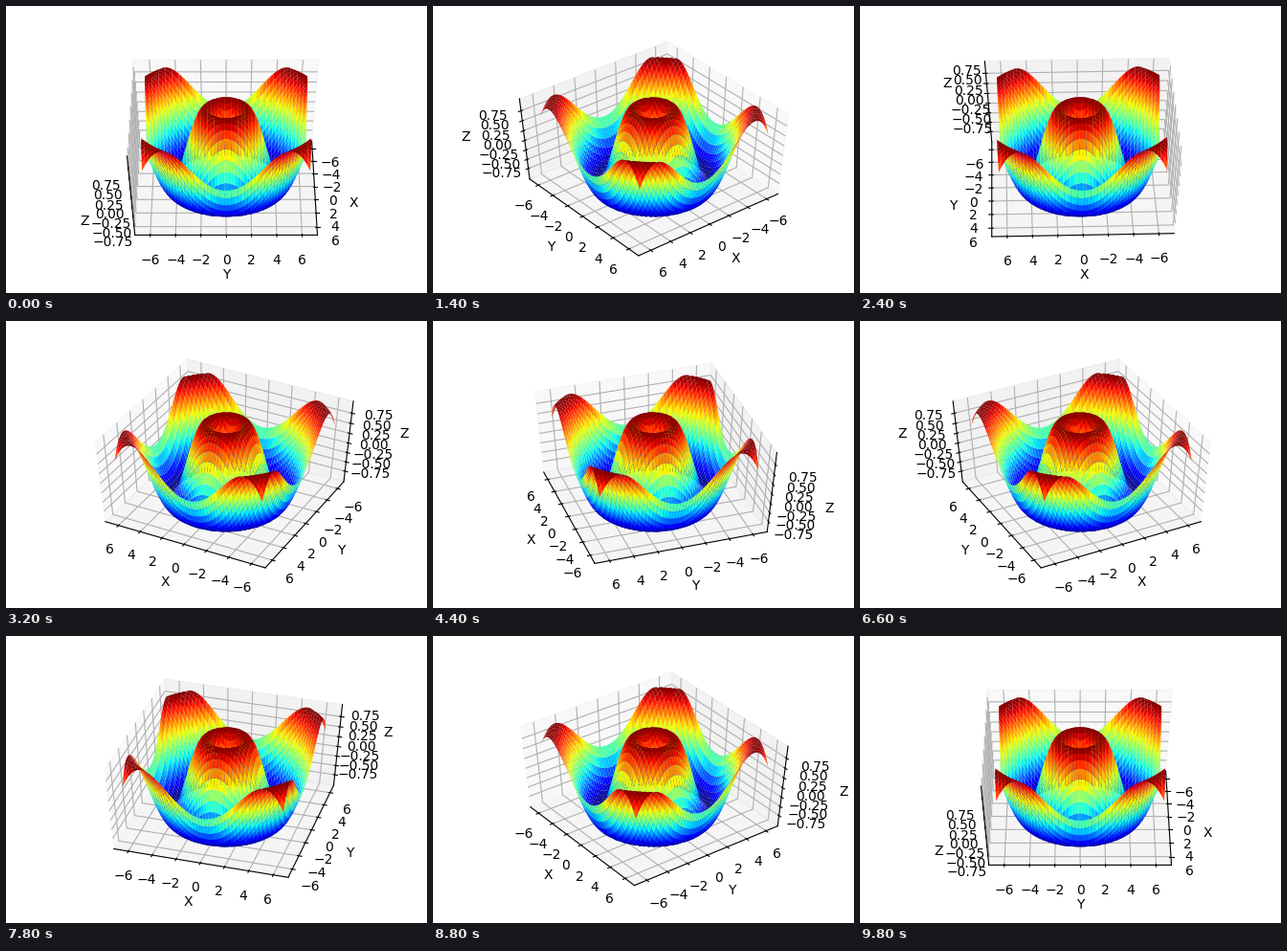
These frames come from a looping animation (440x300 px, 10000 ms). A matplotlib script:

```python
import numpy as np
import matplotlib.pyplot as plt
from matplotlib.animation import FuncAnimation

FRAMES = 50
STEP_MS = 200
ELEV = 50
MARGIN = 25 / 24

fig = plt.figure(figsize=(4.4, 3.0), dpi=100)
ax = fig.add_subplot(projection="3d")

# Unit cube, stretched to fill the whole subplot instead of a square.
ax.set_box_aspect((1, 1, 1), zoom=np.sqrt(3) / 1.8294640721620434)
ax.apply_aspect = lambda position=None: None

side = np.linspace(-2 * np.pi, 2 * np.pi, 50)
x, y = np.meshgrid(side, side)
z = np.sin(np.hypot(x, y))
ax.plot_surface(x, y, z, cmap="jet")

ax.set_xticks(range(-6, 7, 2))
ax.set_yticks(range(-6, 7, 2))
ax.set_zticks(np.arange(-0.75, 1, 0.25))

half = 2 * np.pi * 1.05 ** 2 * MARGIN
ax.set_xlim(-half, half)
ax.set_ylim(-half, half)
ax.set_zlim(-MARGIN, MARGIN)

ax.set_xlabel("X")
ax.set_ylabel("Y")
ax.set_zlabel("Z")


def turn(i):
    # The tiny offset settles which side wall shows in the head-on view.
    azim = (360 * i / (FRAMES - 1)) % 360 + 0.001
    ax.view_init(elev=ELEV, azim=azim)
    return []


def start():
    return turn(0)


anim = FuncAnimation(fig, turn, frames=FRAMES, init_func=start,
                     interval=STEP_MS, repeat=True, repeat_delay=0)
plt.show()
```
